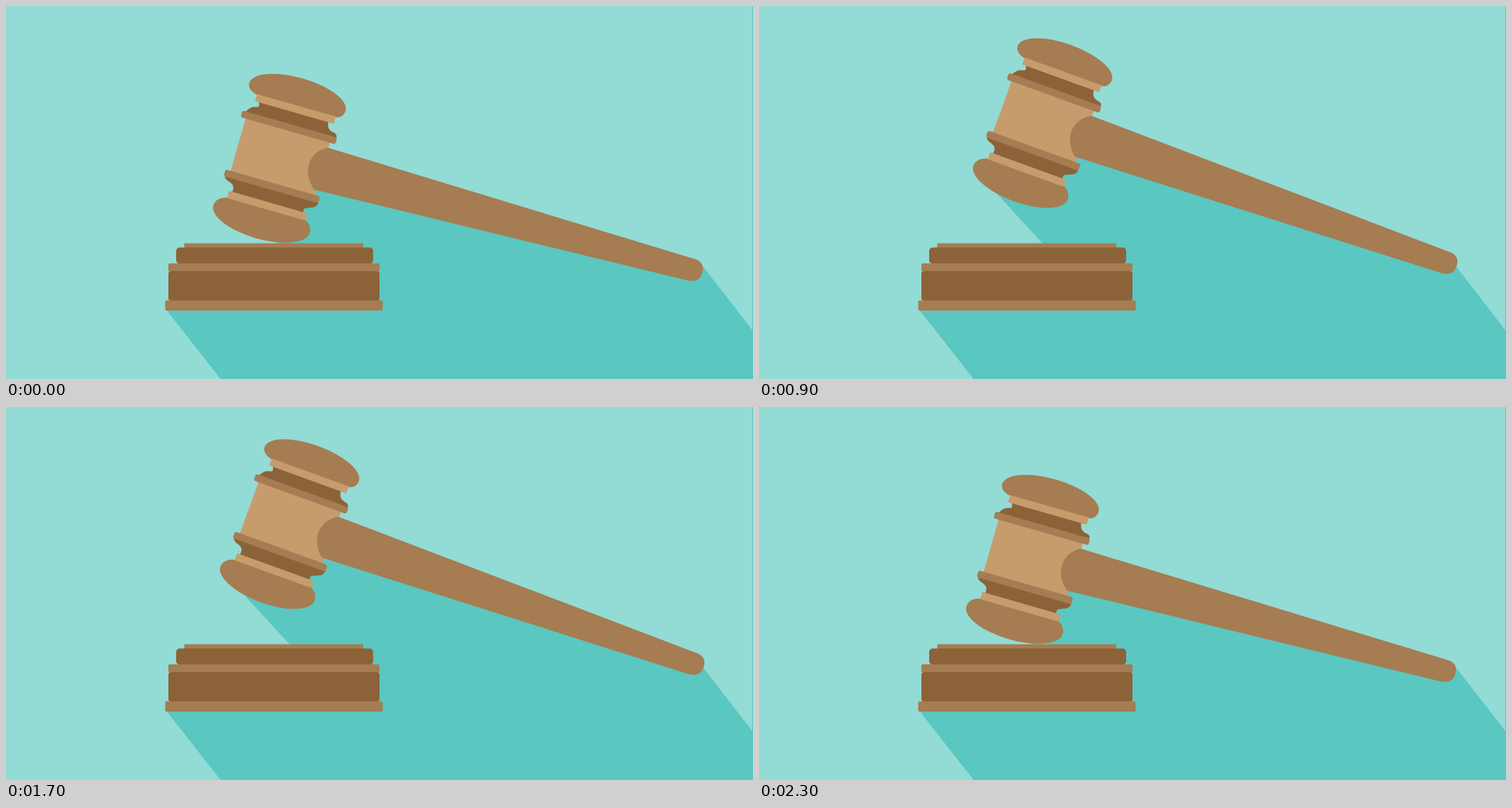
An HTML page that plays this animation: 1058 px wide and 529 px high, repeating every 4300 ms.

```html
<!DOCTYPE html>
<html lang="en">
<head>
<meta charset="utf-8">
<title>Gavel</title>
<style>
  html, body { margin: 0; width: 100%; height: 100%; overflow: hidden; background: #93dbd5; }
  svg { display: block; width: 100vw; height: 100vh; }
  .shade { fill: #5ac7c0; }
  .light { fill: #c69c6d; }
  .mid { fill: #a67c52; }
  .dark { fill: #8c6239; }
  #impact { fill: none; stroke: #fff; stroke-width: 5; stroke-linecap: round; }
</style>
</head>
<body>
<svg viewBox="0 0 1058 529">
  <rect id="edge" class="shade" x="1057" width="1" height="529"/>
  <polygon id="shadow" class="shade"/>
  <path id="impact" d="M142 358L205 350M150 290L212 314M196 227L236 268M597 358L534 350M589 290L527 314"/>

  <g id="block">
    <rect class="mid" x="252.5" y="336.5" width="253.5" height="8"/>
    <rect class="dark" x="241" y="342.5" width="279" height="23" rx="5"/>
    <rect class="mid" x="230" y="365" width="299" height="11.5" rx="2"/>
    <rect class="dark" x="230" y="376" width="299" height="42" rx="4"/>
    <rect class="mid" x="225.5" y="417.5" width="308" height="14.5" rx="2"/>
  </g>

  <g id="gavel">
    <!-- drawn upright around the middle of the head, then tilted -->
    <g id="parts" transform="translate(387 215) rotate(16)">
      <g id="head">
        <path class="mid" d="M-55 -77C-65 -79 -70 -84 -70 -90A71 27 0 0 1 72 -90C72 -83 68 -78 61 -77Z"/>
        <path class="mid" d="M-55 75C-66 77 -71 84 -71 91A71 28 0 0 0 71 91C71 84 67 78 60 75Z"/>
        <path class="dark" d="M-50 -69C-47 -63 -47 -61 -51 -60C-56 -59 -59 -58 -64 -49H70C70 -52 69 -54 66 -55C58 -56 53 -59 53 -69Z"/>
        <path class="dark" d="M-67 46C-66 49 -64 51 -60 52C-52 54 -49 58 -51 66H54C53 60 54 59 58 58C62 55 70 56 71 46Z"/>
        <rect class="light" x="-55" y="-78" width="116" height="10.5" rx="1"/>
        <rect class="light" x="-55" y="65" width="115.5" height="10.5" rx="1"/>
        <rect class="light" x="-61" y="-42" width="124" height="80"/>
        <rect class="mid" x="-68.5" y="-50" width="139.5" height="10" rx="3"/>
        <rect class="mid" x="-68.5" y="37" width="139.5" height="10" rx="3"/>
      </g>
      <path id="handle" class="mid" d="M62 -32.5C53 -28 43 -17 43 -2C43 10 50 22 60 30L604 8C614 7 621 3 621 -8C621 -19 615 -24 605 -24Z"/>
    </g>
  </g>
</svg>
<script>
  const el = id => document.getElementById(id);

  // turn and shift of the gavel; cast: block top, foot and head corners of the shadow
  const rest = { turn: 0, dx: 0, dy: 0, cast: "385,337 362,300 387,215" };
  const low = { turn: 3.95, dx: 2, dy: -10, cast: "402,337 333,262 401,165" };
  const mid = { turn: 9.9, dx: 3.2, dy: -11, cast: "424,337 338,187 426,106", raised: true };
  const top_ = { turn: 15.6, dx: 4.2, dy: -11.8, cast: "444,337 352,116 456,52", raised: true };
  const hit = { ...rest, impact: true };

  const blow = [rest, low, mid, top_, mid, low, hit, rest];
  const STEP = 100, BLOWS = 3, LOOP = 4300;
  let shown;

  function show(pose) {
    el("gavel").setAttribute("transform",
      `translate(${pose.dx} ${pose.dy}) rotate(${pose.turn} 972 375)`);
    el("shadow").setAttribute("points",
      `228,432 ${pose.cast} 985,366.4 1058,461 1058,529 304,529`);
    // the handle passes behind the head while raised
    el("parts")[pose.raised ? "prepend" : "append"](el("handle"));
    el("edge").style.display = pose.raised ? "none" : "";
    el("impact").style.display = pose.impact ? "" : "none";
  }

  function frame() {
    const step = Math.floor(performance.now() % LOOP / STEP);
    const pose = step < BLOWS * blow.length ? blow[step % blow.length] : rest;
    if (pose !== shown) show(shown = pose);
    requestAnimationFrame(frame);
  }
  frame();
</script>
</body>
</html>
```
